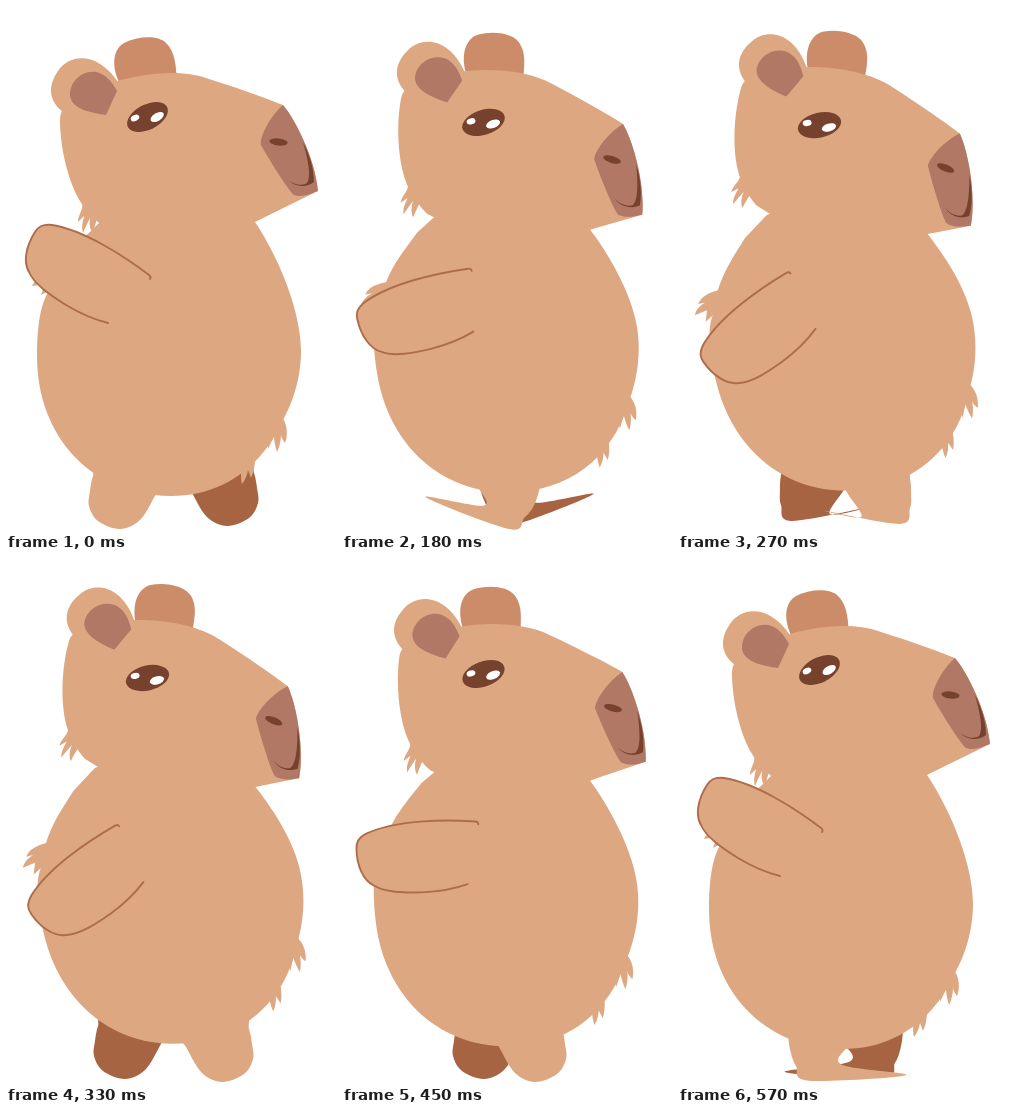
These frames come from a looping animation (330x525 px, 600 ms). An HTML page:

```html
<!DOCTYPE html>
<html lang="en">
<head>
<meta charset="utf-8">
<title>Dancing capybara</title>
<style>
  html, body { margin: 0; width: 100%; height: 100%; overflow: hidden; background: #fff; }
  svg { display: block; width: 330px; height: 525px; }
  .fur { fill: #dda782; }
  .pink { fill: #b17865; }
  .dark { fill: #76422e; }
  .shade { fill: #a66443; }
  .line { stroke: #ae6d4a; stroke-width: 1.9; stroke-linecap: round; }
</style>
</head>
<body>
<svg viewBox="0 0 330 525">
  <path id="farLeg" class="shade" transform="translate(335 -3) scale(-1 1)"/>
  <path id="nearLeg" class="fur"/>
  <g id="body" class="fur">
    <path d="M249 216C272 250 295 305 295 345C295 375 285 400 276 416C255 462 215 490 165 490C85 490 31 430 31 350C31 315 36 295 43 285C56 250 75 235 93 217L119 200L205 180Z"/>
    <path d="M66 262C46 260 37 263 32 270L39 270C32 272 28 276 26 280L39 278L35 289L48 282L66 285Z"/>
    <path d="M270 404L275 410C282 418 282 430 279 437C276 433 275 431 275 428C275 436 273 442 271 446C269 440 268 434 268 430L262 443C262 437 261 433 261 428L255 420Z"/>
    <path d="M250 440C249 460 248 466 245 472L242 464C241 470 239 474 236 478C235 474 235 470 235 460Z"/>
  </g>
  <g id="head">
    <path fill="#cc8c69" d="M115 80C105 62 106 44 118 37C132 30 152 29 160 37C168 45 170 55 171 78Z"/>
    <path class="fur" d="M76 196C78 204 72 208 72 216L78 210C77 216 75 220 77 227C79 222 82 216 84 212C83 218 84 224 87 228C88 222 90 217 91 212L95 218L98 206Z"/>
    <path class="fur" d="M106 77C135 67 175 63 200 72C225 80 255 90 277 99C289 113 309 152 312 185L249 216L230 225L160 240L100 222C92 217 84 209 78 201C62 180 54 140 54 115C54 109 55 106 57 104Z"/>
    <path class="fur" d="M60 108C44 98 40 82 52 65C64 47 92 46 112 76L90 112Z"/>
    <path class="pink" d="M100 109C85 107 66 103 64 90C63 76 76 64 90 66C100 68 106 76 111 85Z"/>
    <path class="pink" d="M277 99C289 113 309 152 312 185L309 186C301 190 293 191 288 189C283 185 265 157 255 139C253 134 262 112 277 99Z"/>
    <path class="dark" d="M297 136C303 148 308 162 308 176C300 182 289 181 282 174C288 179 297 180 301 177C306 170 301 150 297 136Z"/>
    <ellipse class="dark" rx="9.2" ry="3.5" transform="translate(272.5 136) rotate(7)"/>
  </g>
  <g id="eye">
    <ellipse class="dark" rx="22" ry="12.5" transform="rotate(-27)"/>
    <ellipse fill="#fff" rx="4.5" ry="3" transform="translate(-12.5 1) rotate(-25)"/>
    <ellipse fill="#fff" rx="7.3" ry="4" transform="translate(9.7 0) rotate(-30)"/>
  </g>
  <path id="arm" class="fur line" d="M144 273Q145.500 271 143 269C118 250 78 224 46 219C36 218 32 221 29 226C20 240 17 256 23 266C28 278 44 289 60 299C75 308 90 314 102 317"/>
</svg>
<script>
const STEP = 30, STEPS = 20, PEAK = 10;
const $ = id => document.getElementById(id);

// Leg outline around its centre line; the opposite lean is its mirror image.
const leanLeft = [[-22, 450], [-30, 470], [-33, 485], [-34, 500], [-25, 515],
  [-3, 523], [17, 514], [33, 488], [48, 460]];
const leanRight = leanLeft.map(([x, y]) => [-x, y]).reverse();

// Stride: the foot crosses over while one toe trails behind.
const stride = [
  { t: 0, x: 117, lean: -1, trail: 0 },
  { t: 90, x: 125, lean: -1, trail: 0 },
  { t: 180, x: 167, lean: 0, trail: 68 },
  { t: 240, x: 196, lean: 0.7, trail: 80 },
  { t: 330, x: 213, lean: 1, trail: 0 },
  { t: 450, x: 190, lean: 1, trail: 0 },
  { t: 540, x: 141, lean: -0.4, trail: -79 }
];

const mix = (a, b, u) => a + (b - a) * u;

function strideAt(t) {
  const i = stride.findIndex(k => k.t > t);
  if (i < 0) return stride[stride.length - 1];
  const a = stride[i - 1], b = stride[i], u = (t - a.t) / (b.t - a.t);
  return { x: mix(a.x, b.x, u), lean: mix(a.lean, b.lean, u), trail: mix(a.trail, b.trail, u) };
}

function legPoints({ x, lean, trail }) {
  const pts = leanLeft.map((p, i) => {
    const q = leanRight[i], u = (lean + 1) / 2;
    return [x + mix(p[0], q[0], u), mix(p[1], q[1], u)];
  });
  pts[4][1] += 8 * (1 - lean * lean);
  const toe = pts[trail > 0 ? 3 : 5];
  toe[0] -= trail;
  toe[1] -= 0.3 * Math.max(0, trail);
  return pts;
}

// Closed smooth curve through all points.
function blob(pts) {
  const n = pts.length, at = i => pts[(i + n) % n];
  let d = "M" + at(0);
  for (let i = 0; i < n; i++) {
    const a = at(i - 1), b = at(i), c = at(i + 1), e = at(i + 2);
    const out = b.map((v, k) => v + (c[k] - a[k]) / 6);
    const back = c.map((v, k) => v - (e[k] - b[k]) / 6);
    d += `C${out} ${back} ${c}`;
  }
  return d + "Z";
}

const place = (id, value) => $(id).setAttribute("transform", value);

function draw(step) {
  // p runs from arm raised (0) to arm lowered (1) and back.
  const p = step <= PEAK ? step / PEAK : (STEPS - 1 - step) / (STEPS - 1 - PEAK);
  const leg = blob(legPoints(strideAt(step * STEP)));
  $("nearLeg").setAttribute("d", leg);
  $("farLeg").setAttribute("d", leg);
  place("body", `rotate(${-15.2 * p} 143 333)`);
  place("head", `rotate(${17 * p} 173 131)`);
  place("eye", `translate(141.5 ${111 + 9 * p}) rotate(${15.75 * p})`);
  place("arm", `translate(${32.4 * p - 34.5 * p * p} 0) rotate(${-75.5 * p} 123.5 294.5)`);
}

const start = performance.now();
function tick() {
  draw(Math.floor((performance.now() - start) / STEP) % STEPS);
  requestAnimationFrame(tick);
}
tick();
</script>
</body>
</html>
```
